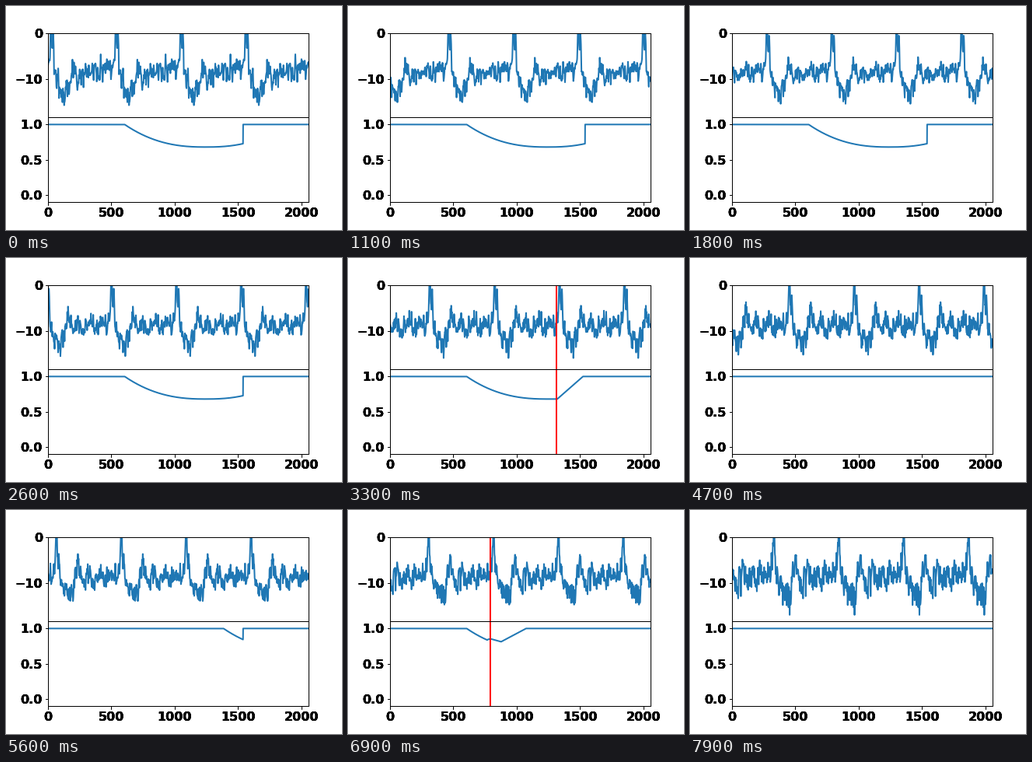
Recreate the animation shown at these times as a matplotlib script. Size 432 by 288 pixels, loop 8000 ms.

```python
import numpy as np
import matplotlib.pyplot as plt
from matplotlib.animation import FuncAnimation

plt.rcParams.update({
    "font.family": "DejaVu Sans",
    "font.size": 16,
    "font.weight": "bold",
    "lines.linewidth": 2,
})

FRAMES, STEP = 80, 100
SIZE, PERIOD, HOP = 2055, 512, 99.8
FIRST_PEAK, JUMP = 24, 1540
INKING = 4  # passes that darken the axes and labels
x = np.arange(SIZE)

rng = np.random.default_rng(7)
coarse = rng.normal(0, 1, (3, 64))
fine = rng.normal(0, 1, (3, 170))


def bump(phase, centre, width):
    d = (phase - centre + PERIOD / 2) % PERIOD - PERIOD / 2
    return np.exp(-(d / width) ** 2)


def cyclic(table, phase, t):
    """Periodic noise that drifts from row to row while t goes 0 to 1."""
    rows = np.arange(len(table))
    weights = np.clip(1 - np.abs(t * rows[-1] - rows), 0, 1)
    values = weights @ table
    knots = np.linspace(0, PERIOD, len(values) + 1)
    return np.interp(phase, knots, np.append(values, values[0]))


def signal(k):
    """Level in dB: a sharp double peak, a deep dip, then chatter."""
    t = k / FRAMES
    phase = (x + HOP * k - FIRST_PEAK) % PERIOD
    peak = bump(phase, 0, 6) + 0.8 * (1 - t) * bump(phase, 17, 5)
    dip = bump(phase, 92, 34 + 6 * t)
    level = (-8.4 + 9 * peak - (5.2 - t) * dip
             + 2.5 * bump(phase, -5, 35) + 3.5 * bump(phase, 171, 8)
             + 0.8 * np.cos(phase * 2 * np.pi * 6 / PERIOD))
    noise = ((1.6 - 0.4 * t) * cyclic(coarse, phase, t)
             + (1 + 0.7 * t + 0.7 * dip) * cyclic(fine, phase, t))
    return np.maximum(level + noise * (1 - 0.8 * bump(phase, 0, 8)), -17.7)


def attack(start):
    u = np.clip((x - start) / 640, 0, None)
    return 0.68 + 0.32 * np.abs(1 - u) ** 2.45


def held(start):
    return np.where(x < JUMP, attack(start), 1)


def released(start, knots, levels):
    return np.where(x < knots[0], attack(start), np.interp(x, knots, levels))


FLAT = np.ones(SIZE)
LONG = held(605)
SHORT = held(1385)
DEEP = released(605, [1235, 1320, 1522], [0.68, 0.68, 1])
BRIEF = released(605, [768, 790, 877, 1073], [0.84, 0.855, 0.812, 1])
WAKE, TURN = 19, 45  # first scan, change from deep to brief limiting


def is_hit(k):
    return k > WAKE and k % 6 == 3


def gain(k):
    if is_hit(k):
        return DEEP if k < TURN else BRIEF
    if k < 39:
        return LONG
    return SHORT if is_hit(k + 1) else FLAT


def marker(k):
    if not is_hit(k):
        return 0
    cycle = 2 if k < TURN else 1
    return (FIRST_PEAK - HOP * k) % PERIOD + PERIOD * cycle - 23


fig = plt.figure(figsize=(6, 4), dpi=72)


def panels():
    top, low = fig.subplots(2, 1, sharex=True, gridspec_kw=dict(
        left=0.125, right=0.9, bottom=0.125, top=0.88, hspace=0))
    top.set(xlim=(0, SIZE), ylim=(-18.3, 0), yticks=[-10, 0])
    low.set(ylim=(-0.1, 1.1), yticks=[0, 0.5, 1], xticks=range(0, 2001, 500))
    top.tick_params(axis="x", length=0)
    return top, low


top, low = panels()
for _ in range(INKING - 1):
    for ax in panels():
        ax.patch.set_visible(False)

wave, = top.plot(x, signal(0), color="C0")
curve, = low.plot(x, gain(0), color="C0", snap=False)
marks = [ax.axvline(0, color="r") for ax in (top, low)]


def update(k):
    wave.set_ydata(signal(k))
    curve.set_ydata(gain(k))
    for mark in marks:
        mark.set_xdata([marker(k)] * 2)
        mark.set_visible(k < WAKE or is_hit(k))
    return [wave, curve, *marks]


anim = FuncAnimation(fig, update, frames=FRAMES, interval=STEP,
                     repeat=True, repeat_delay=0, blit=False)
plt.show()
```
